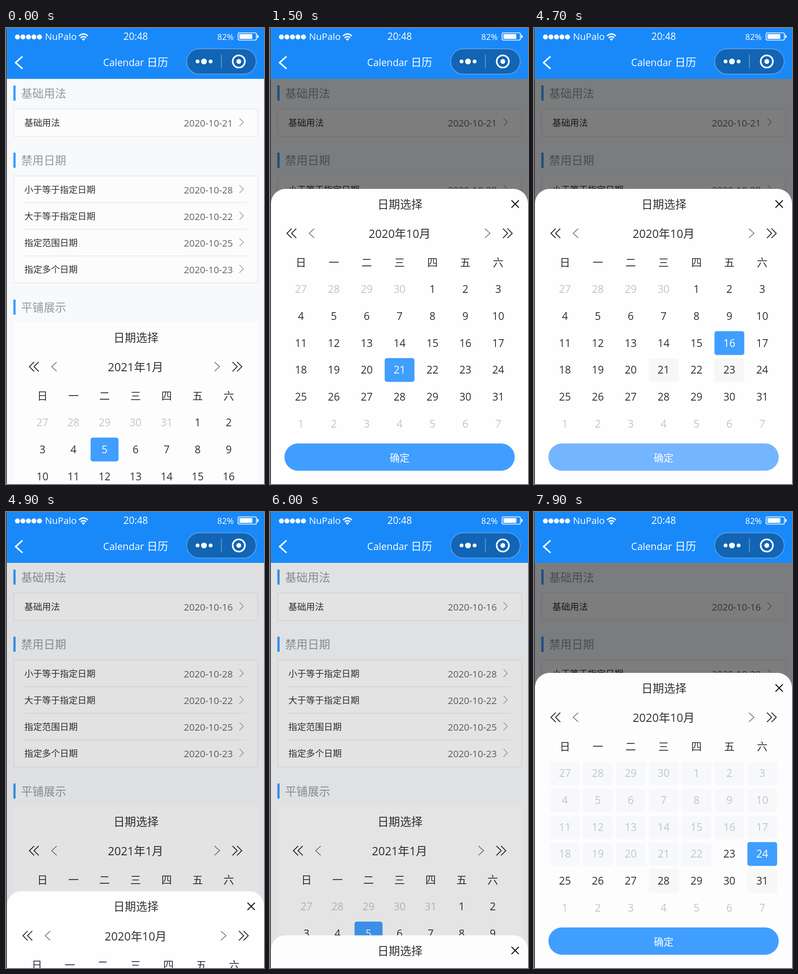
Animation of 563 by 995 pixels, one loop 8 s. Source, as an HTML page:

```html
<!DOCTYPE html>
<html lang="zh-CN">
<head>
<meta charset="utf-8">
<title>Calendar 日历</title>
<style>
html, body { margin: 0; width: 100%; height: 100%; overflow: hidden; }
svg { display: block; font-family: "Open Sans", "Noto Sans CJK SC", "Noto Sans CJK", sans-serif; }
</style>
</head>
<body>
<svg id="stage" width="563" height="995" viewBox="0 0 563 995"></svg>
<script>
const BLUE = '#409eff', INK = '#303133', MUTED = '#c3c5c8', MID = 282.8;
const stage = document.getElementById('stage');

const rect = (x, y, w, h, fill, r = 0, extra = '') =>
  `<rect x="${x}" y="${y}" width="${w}" height="${h}" rx="${r}" fill="${fill}" ${extra}/>`;
const dot = (x, y, r, extra = 'fill="#fff"') => `<circle cx="${x}" cy="${y}" r="${r}" ${extra}/>`;
const line = (d, color, width) => `<path d="${d}" fill="none" stroke="${color}" stroke-width="${width}"/>`;
// Text is placed by its vertical centre.
const text = (s, x, cy, size, fill, anchor = 'start', weight = 400) =>
  `<text x="${x}" y="${cy + size * .36}" font-size="${size}" fill="${fill}" text-anchor="${anchor}" font-weight="${weight}">${s}</text>`;
// dx points from the tip towards the open side.
const chevron = (x, y, dx, h, color, width) =>
  line(`M${x + dx} ${y - h}L${x} ${y}L${x + dx} ${y + h}`, color, width);

function header() {
  let s = rect(2, 0, 561, 111, '#1989fa');
  for (let i = 0; i < 5; i++) s += dot(25 + i * 12, 19.5, 5.4);
  s += text('NuPalo', 85, 18.5, 20.5, '#fff');
  s += line('M159.5 17.5Q169 8.500 178.500 17.5M163 21.500Q169 16 175 21.500', '#fff', 3);
  s += '<path d="M165.300 24Q169 21 172.700 24L169 28Z" fill="#fff"/>';
  s += text('20:48', 283, 18, 21, '#fff', 'middle');
  s += text('82%', 461, 19.5, 18.3, '#fff');
  s += rect(506.5, 10.5, 40, 16, 'none', 3, 'stroke="#fff" stroke-width="1.7"');
  s += rect(509.5, 13.3, 28, 10.400, '#fff', 1) + rect(548, 15, 3, 7, '#fff', 1.5);
  s += chevron(21, 75.5, 15, 13.5, '#fff', 3.3);
  s += text('Calendar', 212, 75, 21.3, '#fff', 'start', 500);
  s += text('日历', 307.5, 75, 23.2, '#fff', 'start', 500);
  s += rect(394.3, 45.5, 151.5, 55, '#1264b4', 27.5, 'stroke="#70a6dc" stroke-width="1.5"');
  s += dot(418, 73, 4.3) + dot(432, 73, 6.3) + dot(446.5, 73, 4.3);
  s += line('M470 57.5V88', '#6f9fd0', 1.5);
  return s + dot(508, 73, 13.3, 'fill="none" stroke="#fff" stroke-width="3.6"') + dot(508, 73, 5.3);
}

const heading = (s, cy) => rect(16, cy - 17, 5, 33, BLUE) + text(s, 33, cy + .5, 24.6, '#8f9ba1');

function card(y, h, rows) {
  let s = rect(16.7, y, 532.3, h, '#fcfcfd', 0, 'stroke="#e4e7ea" stroke-width="1.5"');
  rows.forEach(([label, date], i) => {
    const cy = y + 30.8 + i * 58;
    if (i) s += line(`M40 ${cy - 30.300}H525`, '#e6e8ea', 1.5);
    s += text(label, 40, cy, 19.4, INK) + text(date, 388, cy, 20.5, '#606266');
    s += chevron(518, cy - 1.8, -8.5, 8.5, '#858689', 1.2);
  });
  return s;
}

function calendar(top, o) {
  const left = MID - 3 * o.pitch - o.cell / 2;
  let s = text('日期选择', 283.700, top + 34, 24.6, INK, 'middle');
  s += text(o.month, MID, top + 98.5, 24.9, INK, 'middle');
  for (const side of [1, -1]) {
    const at = d => side > 0 ? left + d : 2 * MID - left - d;
    for (const d of [2, 12]) s += chevron(at(d), top + 97, side * 10.3, 10.3, INK, 2);
    s += chevron(at(50.5), top + 97, side * 11, 10, '#55565a', 1.3);
  }
  [...'日一二三四五六'].forEach((c, i) =>
    s += text(c, MID + (i - 3) * o.pitch, top + 161, 23, INK, 'middle'));
  for (let i = 0; i < 42; i++) {
    const x = MID + (i % 7 - 3) * o.pitch, y = top + 219 + Math.floor(i / 7) * 58.75;
    const d = i - o.lead + 1, picked = d === o.picked, off = d <= o.limit;
    const fill = picked ? BLUE : off ? '#f7f8fb' : o.touched.includes(d) ? '#f7f7f8' : '';
    if (fill) s += rect(x - o.cell / 2, y - 24.7 - (off ? -.7 : 1.3), o.cell, off ? 50 : 52, fill, 5);
    const label = d < 1 ? d + o.before : d > 31 ? d - 31 : d;
    const color = picked ? '#fff' : d < 1 || d > 31 || off ? MUTED : INK;
    s += text(label, x, y, 22.9, color, 'middle', picked ? 500 : 400);
  }
  return s;
}

function page(date) {
  return rect(0, 0, 563, 995, '#f8f9fb')
    + heading('基础用法', 142.5) + card(176.5, 60, [['基础用法', date]])
    + heading('禁用日期', 289) + card(322.7, 233.5, [
      ['小于等于指定日期', '2020-10-28'],
      ['大于等于指定日期', '2020-10-22'],
      ['指定范围日期', '2020-10-25'],
      ['指定多个日期', '2020-10-23']])
    + heading('平铺展示', 609.5) + rect(16, 642, 534, 353, '#fdfdfd')
    + calendar(642, { month: '2021年1月', pitch: 67.75, cell: 61, lead: 5, before: 31, picked: 5, touched: [], limit: -9 });
}

function sheet(t) {
  const second = t >= 5500;
  const days = second ? [28, 31, 24] : [21, 23, 16];
  const [a, b] = second ? [7200, 7900] : [3100, 3800];
  const n = (t >= a) + (t >= b);
  return `<path d="M2 995V383A32 32 0 0 1 34 351H531A32 32 0 0 1 563 383V995Z" fill="${second ? '#fdfdfd' : '#fefefe'}"/>`
    + calendar(351, {
      month: '2020年10月', pitch: 71.77, cell: 65, lead: 4, before: 30,
      picked: days[n], touched: days.slice(0, n), limit: second ? 22 : -9 })
    + line('M527 376L543 392M543 376L527 392', '#111', 2.2)
    + rect(31.5, 906.5, 502.5, 59.5, t >= 4700 && t < 4800 ? '#73b5ff' : BLUE, 29.75)
    + text('确定', 282.8, 938.5, 21.6, '#fff', 'middle', 500);
}

// The standard CSS "ease" curve, solved by bisection.
function ease(x) {
  if (x <= 0) return 0;
  if (x >= 1) return 1;
  const curve = (p, q, s) => 3 * p * (1 - s) ** 2 * s + 3 * q * (1 - s) * s * s + s ** 3;
  let lo = 0, hi = 1;
  for (let i = 0; i < 25; i++) {
    const m = (lo + hi) / 2;
    if (curve(.25, .25, m) < x) lo = m; else hi = m;
  }
  return curve(.1, 1, lo);
}

// How far the sheet is open; lead is the time already run at the first step.
function opened(t, lead) {
  const move = start => t < start ? 0 : ease((t - start + lead) / 300);
  return move(1200) - move(4800) + move(6000);
}

function draw(t) {
  const open = opened(t, 33);
  stage.innerHTML = page(t < 4800 ? '2020-10-21' : '2020-10-16')
    + rect(0, 111, 563, 884, '#000', 0, `opacity="${opened(t, 47) / 2}"`)
    + (open > 0 ? `<g transform="translate(0 ${(1 - open) * 644})">${sheet(t)}</g>` : '')
    + header() + rect(0, 0, 1.7, 995, '#333');
}

let last = -1;
function tick() {
  const t = Math.floor(performance.now() % 8000 / 100) * 100;
  if (t !== last) draw(last = t);
  requestAnimationFrame(tick);
}
tick();
</script>
</body>
</html>
```
